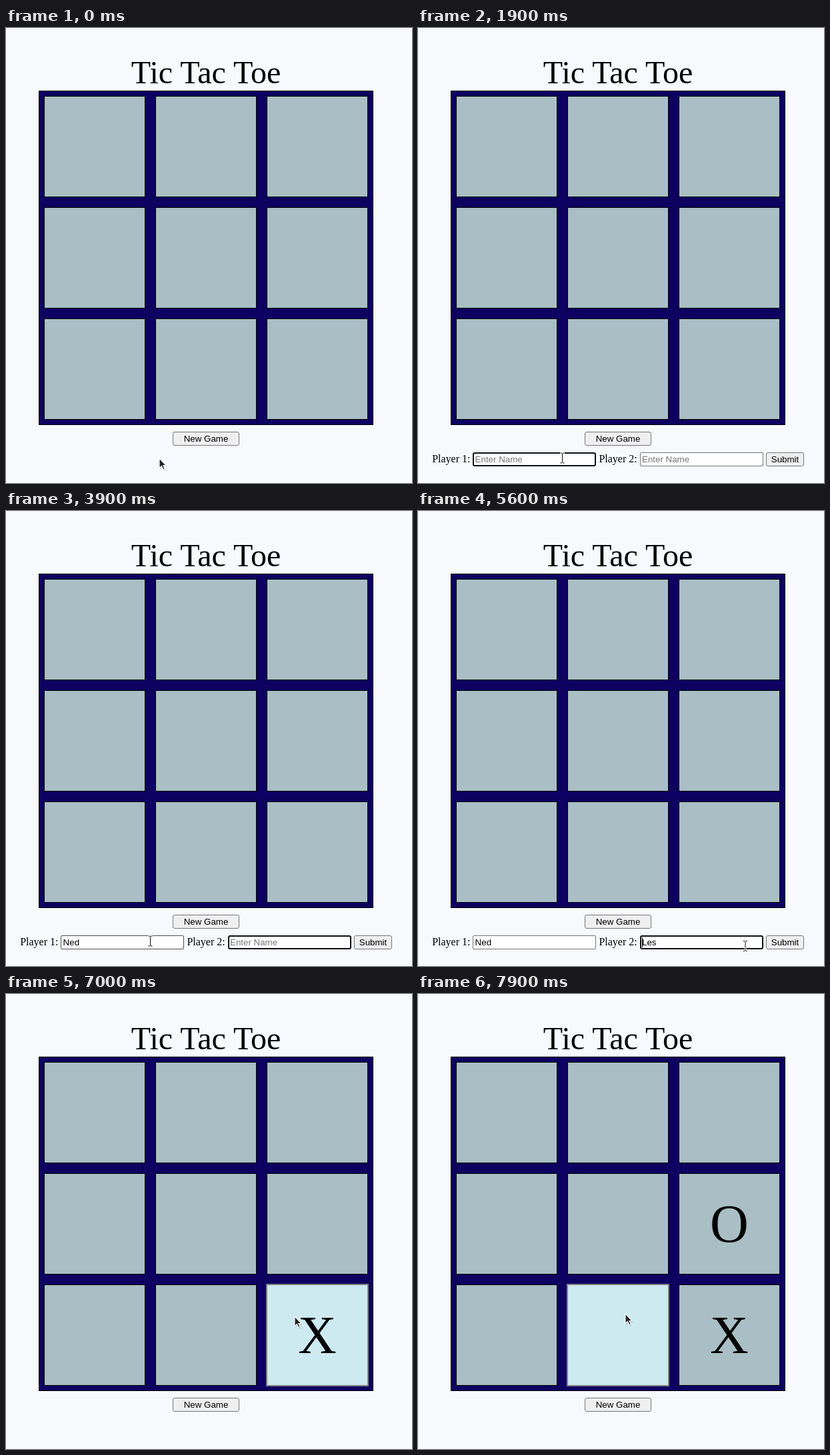
Animation, 609 px wide and 683 px high, one loop 8 s. Source, as an HTML page:

```html
<!DOCTYPE html>
<html lang="en">
<head>
<meta charset="utf-8">
<title>Tic Tac Toe</title>
<style>
  html, body { margin: 0; width: 100%; height: 100%; overflow: hidden; background: #f7f9fd; }
  #stage { position: relative; width: 609px; height: 683px; overflow: hidden; background: #f7f9fd; }
  #stage div, #stage svg { position: absolute; box-sizing: border-box; white-space: pre; }
  .serif { font-family: "Liberation Serif", "Times New Roman", serif; color: #000; }
  .title { left: 0; top: 40px; width: 600px; text-align: center; font-size: 48px; line-height: 53px; }
  .board { left: 49px; top: 94px; width: 502px; height: 502px; background: #0d0060; border: 1px solid #000; }
  .cell { width: 152px; height: 152px; background: #a9bfc5; border: 1px solid #000; }
  .cell.over { margin: -1px; width: 154px; height: 154px; background: #cdeaf1; border: 2px solid #808080; }
  .mark { width: 152px; height: 88px; text-align: center; font-size: 80px; line-height: 88px; }
  .button, .field { height: 21px; border: 1px solid #767676; color: #000;
    font: 13.333px/15px "Liberation Sans", Arial, sans-serif; }
  .button { padding-top: 2px; border-radius: 3px; background: #efefef; text-align: center; }
  .button.over { background: #e5e5e5; border-color: #4f4f4f; }
  .button.down { background: #f5f5f5; border-color: #8d8d8d; }
  .field { width: 185px; border-radius: 2px; background: #fff; }
  .field.over { border-color: #4f4f4f; }
  .field.focus { border: 2px solid #101010; border-radius: 3px; }
  .label { top: 638px; font-size: 16px; line-height: 17px; }
  .value { top: 640px; height: 15px; font: 13.333px/15px "Liberation Sans", Arial, sans-serif; color: #000; }
  .value.empty { color: #757575; }
  .value i { position: absolute; top: 0; width: 1px; height: 15px; background: #000; }
  .value.empty i { left: 0; }
  #pointer { left: 0; top: 0; width: 1px; height: 1px; overflow: visible; }
</style>
</head>
<body>
<div id="stage">
  <div class="title serif">Tic Tac Toe</div>
  <div class="board"></div>
  <div id="cells"></div>
  <div id="newGame" class="button" style="left:250px;top:606px;width:100px">New Game</div>
  <div id="form">
    <div class="label serif" style="left:21.15px">Player 1:</div>
    <div class="field" style="left:82px;top:637px"></div>
    <div class="value" style="left:85.6px"><span></span><i></i></div>
    <div class="label serif" style="left:271.4px">Player 2:</div>
    <div class="field" style="left:333px;top:637px"></div>
    <div class="value" style="left:336px"><span></span><i></i></div>
    <div id="submit" class="button" style="left:522px;top:637px;width:57px">Submit</div>
  </div>
  <svg id="pointer">
    <g id="arrow">
      <path d="M1 1.5V16.5L4.4 13.2L6.8 18.6L9.6 17.4L7.2 12.2H12Z" fill="#000" opacity=".16"/>
      <path d="M0 0V14.6L3.4 11.4L5.8 16.8L8.2 15.7L5.8 10.5H10.2Z" fill="#222"
        stroke="#fff" stroke-width="1.1" stroke-linejoin="round"/>
    </g>
    <g id="beam" fill="none">
      <path d="M-3.5 -7.5H3.5M-3.5 7.5H3.5M0 -7.5V7.5" stroke="#fff" stroke-width="3"/>
      <path d="M-3 -7.5H-1L0 -6.5L1 -7.5H3M-3 7.5H-1L0 6.5L1 7.5H3M0 -6.5V6.5" stroke="#111"/>
    </g>
  </svg>
</div>
<script>
const LOOP = 8000;
const SHOW = 700, HIDE = 6200;

// [time, x, y]: the pointer jumps from one place to the next
const path = [
  [0, 230, 646], [100, 240, 643], [200, 258, 632], [300, 274, 621], [400, 284, 615],
  [1000, 270, 623], [1100, 242, 635], [1200, 221, 644], [1300, 216.5, 645.5],
  [5200, 269, 644], [5300, 322, 645], [5500, 428, 651], [5600, 491, 653],
  [5700, 520, 652], [5800, 537, 651], [5900, 545, 650],
  [6400, 522, 606], [6500, 456, 510], [6600, 433, 484],
  [7200, 440, 428], [7300, 445.5, 366], [7800, 381, 425], [7900, 311, 480]
];
const typed = [
  [[0, ""], [2300, "N"], [2600, "Ne"], [2800, "Ned"]],
  [[0, ""], [4000, "L"], [4200, "Le"], [4300, "Les"]]
];
const focus = [[0, -1], [1300, 0], [3400, 1]];
const caret = [[0, 0], [1300, 1], [1900, 0], [2300, 1], [3300, 0], [3400, 1], [3900, 0],
  [4000, 1], [4900, 0], [5500, 1], [6000, 0]];
const marks = [[7000, 8, "X"], [7700, 5, "O"]];

const $ = id => document.getElementById(id);
const at = (steps, t) => steps.findLast(s => s[0] <= t);
const inside = (x, y, left, top, w, h) => x >= left && x < left + w && y >= top && y < top + h;
const show = (el, on) => { el.style.visibility = on ? "visible" : "hidden"; };
const add = (cls, left, top) => {
  const el = document.createElement("div");
  el.className = cls;
  el.style.left = left + "px";
  el.style.top = top + "px";
  return $("cells").appendChild(el);
};

const cells = Array.from({ length: 9 }, (_, i) => {
  const left = 57 + 167 * (i % 3), top = 102 + 167 * Math.floor(i / 3);
  return { left, top, el: add("cell", left, top) };
});
const markEls = marks.map(([, i, text]) => {
  const el = add("mark serif", cells[i].left, cells[i].top + 32);
  el.textContent = text;
  return el;
});
const fields = [...document.querySelectorAll(".field")];
const values = [...document.querySelectorAll(".value")];

function render(t) {
  const [, x, y] = at(path, t);
  const form = t >= SHOW && t < HIDE;
  const active = at(focus, t)[1];
  let beam = false;

  cells.forEach(c => c.el.classList.toggle("over", inside(x, y, c.left, c.top, 152, 152)));
  marks.forEach(([time, i], n) => {
    const on = t >= time;
    show(markEls[n], on);
    beam ||= on && inside(x, y, cells[i].left + 47, cells[i].top + 32, 58, 88);
  });

  $("form").style.display = form ? "block" : "none";
  fields.forEach((el, n) => {
    const over = form && inside(x, y, n ? 333 : 82, 637, 185, 21);
    beam ||= over;
    el.classList.toggle("over", over);
    el.classList.toggle("focus", n === active);
    const text = at(typed[n], t)[1];
    const [span, bar] = values[n].children;
    values[n].classList.toggle("empty", !text);
    span.textContent = text || "Enter Name";
    bar.style.display = n === active && at(caret, t)[1] ? "block" : "none";
  });

  $("newGame").classList.toggle("over", inside(x, y, 250, 606, 100, 21));
  $("newGame").classList.toggle("down", t >= 600 && t < SHOW);
  $("submit").classList.toggle("over", inside(x, y, 522, 637, 57, 21));
  $("submit").classList.toggle("down", t >= 6100 && t < HIDE);

  show($("arrow"), !beam);
  show($("beam"), beam);
  $("pointer").style.transform = `translate(${x}px, ${y}px)`;
}

const start = performance.now();
function tick() {
  render((performance.now() - start) % LOOP);
  requestAnimationFrame(tick);
}
tick();
</script>
</body>
</html>
```
